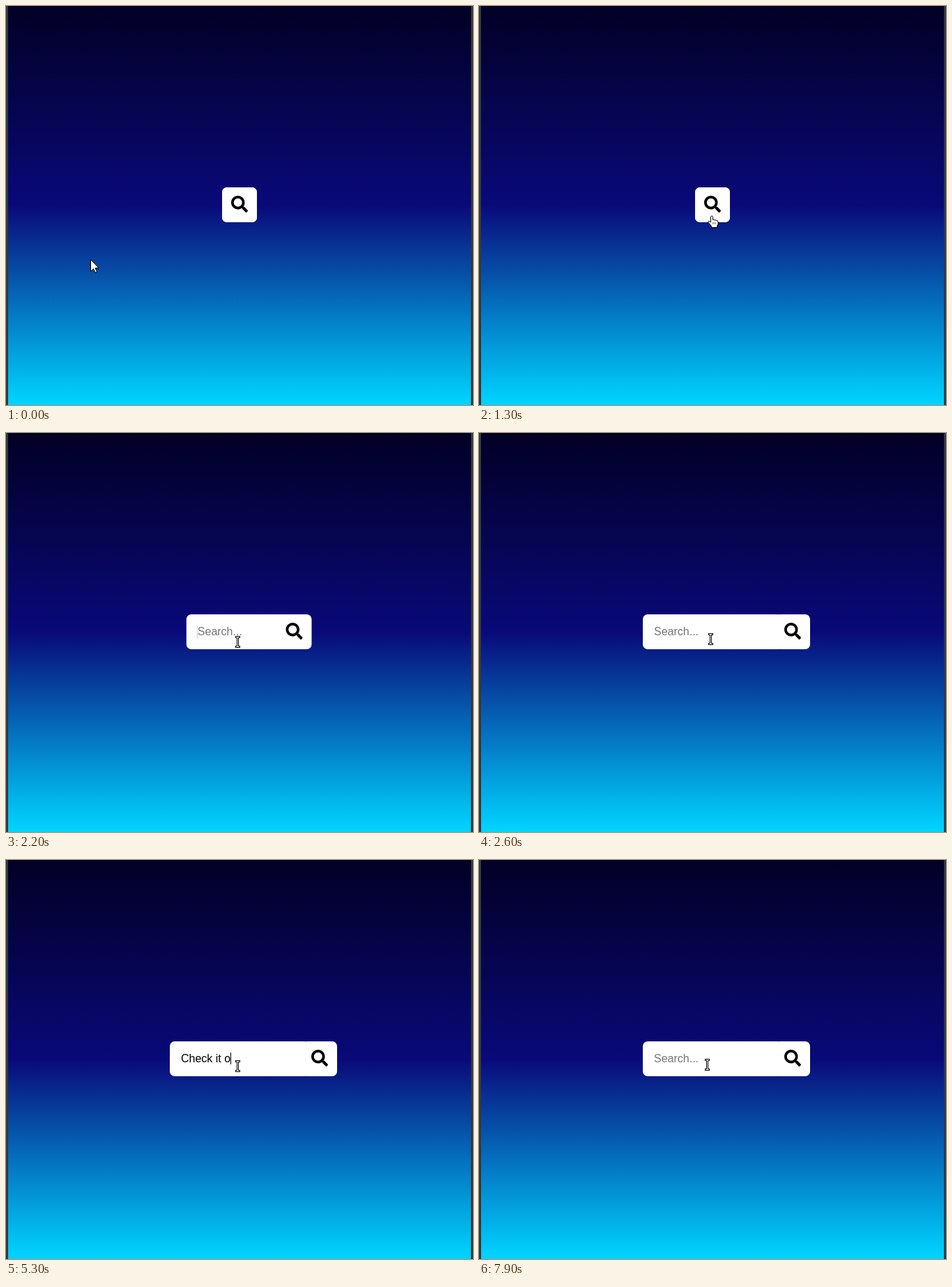
These frames come from a looping animation (670 by 572 pixels, 8000 ms). An HTML page with a canvas:

```html
<!DOCTYPE html>
<html lang="en">
<head>
<meta charset="utf-8">
<title>Expanding search box</title>
<style>
  html, body { margin: 0; width: 100%; height: 100%; overflow: hidden; background: #020024; }
  canvas { display: block; }
</style>
</head>
<body>
<canvas id="stage" width="670" height="572"></canvas>
<script>
const ctx = document.getElementById('stage').getContext('2d');
const W = 670, H = 572, LOOP = 8000, STEP = 100;
const OPEN_AT = 2000, OPEN_MS = 500;

const sky = ctx.createLinearGradient(0, 0, 0, 570);
sky.addColorStop(0, '#020024');
sky.addColorStop(0.5, '#090979');
sky.addColorStop(1, '#00d4ff');

const lens = new Path2D('M505 442.7L405.3 343c-4.5-4.5-10.6-7-17-7H372c27.6-35.3 44-79.7 44-128C416 93.1 322.9 0 208 0S0 93.1 0 208s93.1 208 208 208c48.3 0 92.7-16.4 128-44v16.3c0 6.4 2.5 12.5 7 17l99.7 99.7c9.4 9.4 24.6 9.4 33.9 0l28.3-28.3c9.4-9.4 9.4-24.6.1-34zM208 336a128 128 0 1 1 0-256a128 128 0 1 1 0 256z');
const arrow = new Path2D('M.5 .5V17.5L4.5 13.8L7 19.3L9.5 18.2L7.1 12.7H12.2Z');
const hand = new Path2D('M4.5 10V2.5a1.5 1.5 0 0 1 3 0V6.5q1.5-.8 2.5 .5q1.5-.6 2.4 .6q2.6-.5 2.6 2V13l-1.2 2V17.5H5.5V15.5L1 10.2q-.5-1.7 1.3-1.6z');

// Typed text from each moment on
const typing = [
  [0, ''], [4400, 'Ch'], [4600, 'Che'], [4700, 'Chec'], [4800, 'Check'],
  [4900, 'Check '], [5000, 'Check i'], [5100, 'Check it'], [5200, 'Check it '],
  [5300, 'Check it o'], [5400, 'Check it out'], [5700, 'Check it out!'],
  [6400, 'Check it out'], [6600, 'Check it '], [6900, 'Check '], [7100, '']
];
const caretOn = [[2000, 2600], [3200, 3800], [4400, 6300], [6900, 7500]];

const clamp = v => Math.min(1, Math.max(0, v));
const lerp = (a, b, u) => a + (b - a) * u;
const easeOut = (u, power) => 1 - Math.pow(1 - u, power);

// CSS "ease": cubic-bezier(.25, .1, .25, 1)
function ease(x) {
  const bez = (s, a, b) => 3 * s * (1 - s) * (1 - s) * a + 3 * s * s * (1 - s) * b + s * s * s;
  let lo = 0, hi = 1;
  for (let i = 0; i < 24; i++) {
    const mid = (lo + hi) / 2;
    if (bez(mid, 0.25, 0.25) < x) lo = mid; else hi = mid;
  }
  return bez(lo, 0.1, 1);
}

function rect(x, y, w, h, color) {
  ctx.fillStyle = color;
  ctx.fillRect(x, y, w, h);
}

function panel(x, w) {
  ctx.fillStyle = '#fff';
  ctx.beginPath();
  ctx.roundRect(x, 260, w, 50, 7);
  ctx.fill();
}

function drawField(t, x, w) {
  panel(x, w);
  const text = typing.filter(([at]) => at <= t).pop()[1];
  const left = x + 16;
  ctx.save();
  ctx.beginPath();
  ctx.rect(left, 260, Math.max(0, w - 32), 50);
  ctx.clip();
  ctx.font = '16px "Liberation Sans", Arial, sans-serif';
  ctx.fillStyle = text ? '#000' : '#757575';
  ctx.fillText(text || 'Search...', left, 290);
  if (caretOn.some(([from, to]) => t >= from && t < to)) {
    rect(Math.floor(left + ctx.measureText(text).width), text ? 276 : 277, 1, 17, '#000');
  }
  ctx.restore();
}

function drawButton(x) {
  panel(x, 50);
  ctx.save();
  ctx.translate(x + 13, 272);
  ctx.scale(24 / 512, 24 / 512);
  ctx.fillStyle = '#000';
  ctx.fill(lens, 'evenodd');
  ctx.restore();
}

function pointer(shape, x, y) {
  ctx.save();
  ctx.translate(x, y);
  ctx.lineWidth = 1;
  ctx.lineJoin = 'round';
  ctx.fillStyle = '#fff';
  ctx.strokeStyle = '#000';
  ctx.fill(shape);
  ctx.stroke(shape);
  if (shape === hand) {
    for (const fx of [7, 9, 11]) rect(fx, 10, 1, 3, '#888');
  }
  ctx.restore();
}

function beam(x, y) {
  const parts = [[-3, -8, 7, 3], [-1, -8, 3, 17], [-3, 6, 7, 3]];
  for (const [dx, dy, w, h] of parts) rect(x + dx, y + dy, w, h, '#000');
  for (const [dx, dy, w, h] of parts) rect(x + dx + 1, y + dy + 1, w - 2, h - 2, '#fff');
}

function drawCursor(t) {
  if (t < 1300) {
    const u = clamp((t - 300) / 900);
    pointer(arrow, Math.round(lerp(121, 330, easeOut(u, 2))), Math.round(lerp(363, 308, easeOut(u, 1.26))));
  } else if (t < 2200) {
    const dx = t < 1400 ? 1 : t < 1600 ? 3 : 0;
    pointer(hand, 327 + dx, 300);
  } else if (t < 7900) {
    beam(332, Math.round(lerp(299, 295, clamp((t - 2200) / 200))));
  } else {
    beam(327, 293);
  }
}

function draw(t) {
  rect(0, 0, W, H, sky);
  rect(0, 0, 3, H, '#30393f');
  rect(667, 0, 3, H, '#30393f');
  const open = ease(clamp((t - OPEN_AT) / OPEN_MS));
  const w = lerp(50, 200, open);
  const x = 335 - w / 2;
  drawField(t, x, w);
  drawButton(x + 190 * open);
  drawCursor(t);
}

const start = performance.now();
function tick() {
  const t = (performance.now() - start) % LOOP;
  draw(Math.floor(t / STEP) * STEP);
  requestAnimationFrame(tick);
}
tick();
</script>
</body>
</html>
```
